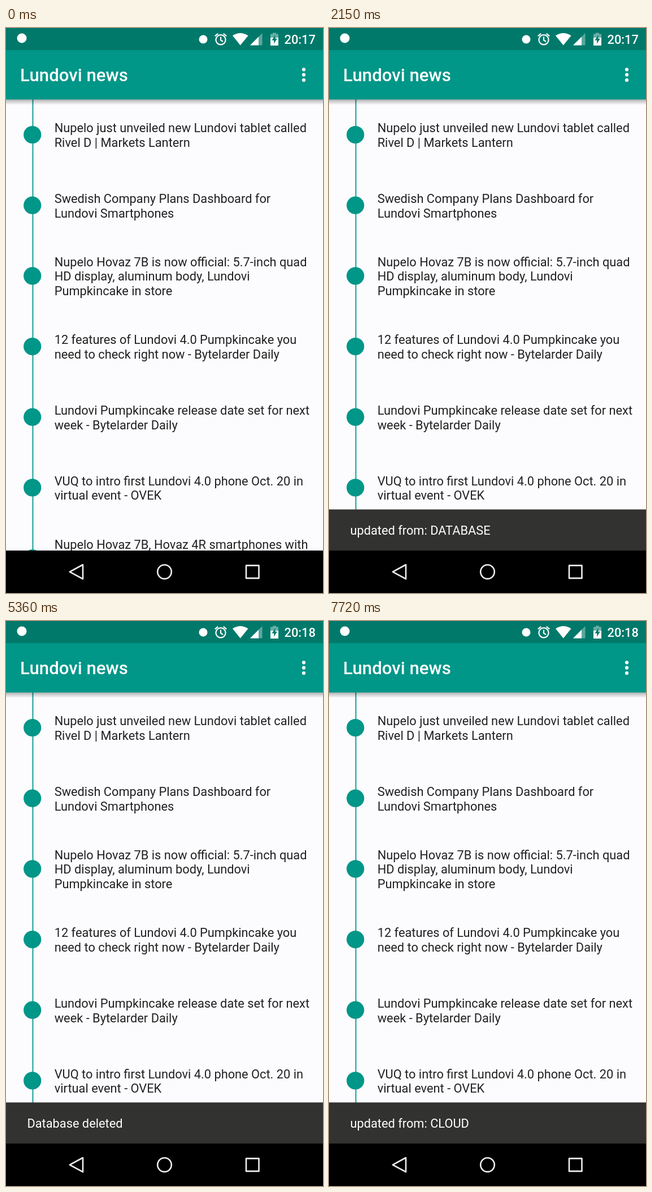
Recreate the animation shown at these times as an HTML page. Size 561x998 px, loop 8000 ms.

```html
<!DOCTYPE html>
<html lang="en">
<head>
<meta charset="utf-8">
<title>News timeline</title>
<style>
  html, body { margin: 0; width: 100%; height: 100%; overflow: hidden; background: #000; }
  svg { display: block; width: 100%; height: 100%; font: 21.8px Roboto, sans-serif; }
  #items text { fill: #212121; }
  #menu > .card { fill: #f7f5fb; filter: drop-shadow(0 1px 2px rgba(0, 0, 0, .22)) drop-shadow(0 6px 6px rgba(0, 0, 0, .3)); }
  #menu text { font-size: 24.93px; fill: #1e1e1e; }
  #menu .ripple, #touches g, #overflow { opacity: 0; }
  .medium { font-weight: 500; fill: #fff; }
</style>
</head>
<body>
<svg id="stage" viewBox="0 0 561 998">
  <defs>
    <linearGradient id="shade" x2="0" y2="1">
      <stop offset="0" stop-opacity=".3"/>
      <stop offset=".45" stop-opacity=".16"/>
      <stop offset="1" stop-opacity="0"/>
    </linearGradient>
    <clipPath id="bar"><rect y="39" width="561" height="87"/></clipPath>
  </defs>

  <rect width="561" height="998" fill="#fcfbfe"/>
  <g fill="#009688">
    <rect x="46.6" y="126" width="1.8" height="797"/>
    <g id="dots"></g>
  </g>
  <g id="items"></g>
  <g id="snacks"></g>

  <rect y="126" width="561" height="10" fill="url(#shade)"/>
  <rect y="39" width="561" height="87.3" fill="#009688"/>
  <rect width="561" height="39" fill="#00796b"/>
  <text class="medium" x="24.9" y="94" font-size="31.17">Lundovi news</text>
  <g fill="#fff">
    <circle id="overflow" cx="527" cy="82.6" r="37" clip-path="url(#bar)"/>
    <circle cx="527" cy="73.3" r="3.1"/>
    <circle cx="527" cy="82.6" r="3.1"/>
    <circle cx="527" cy="92" r="3.1"/>
  </g>

  <g id="status" fill="#fff">
    <circle cx="28" cy="18" r="8.5"/>
    <circle cx="349" cy="20" r="7.5"/>
    <g fill="none" stroke="#fff" stroke-width="2.2">
      <circle cx="380" cy="20.8" r="8.6"/>
      <path d="M380 15.5V21.3L384 24M369.8 14.4L375.2 9.9M390.2 14.4L384.8 9.9"/>
    </g>
    <path d="M401 13.5Q414.700 4.500 428.500 13.5L414.700 30.5Z"/>
    <path d="M432 30.500L453.500 9V30.500Z" opacity=".35"/>
    <path d="M432 30.500L447 15.500V30.500Z"/>
    <path d="M468 10.500H472V8.500H478V10.500H482V18H468Z" opacity=".4"/>
    <path d="M468 17H482V31H468Z"/>
    <path d="M476.500 12.500L470.500 21.800H474.200V27.800L479.800 18.700H476.500Z" fill="#00796b"/>
  </g>
  <text id="clockA" class="medium" x="492.500" y="28">20:17</text>
  <text id="clockB" class="medium" x="492.500" y="28">20:18</text>

  <rect y="923" width="561" height="75"/>
  <g fill="none" stroke="#eee" stroke-width="2.6" stroke-linejoin="round">
    <path d="M112.800 960.600L136 948V973.200Z"/>
    <circle cx="280.500" cy="960.600" r="12.300"/>
    <rect x="425" y="949.400" width="22.500" height="22.500"/>
  </g>

  <g id="menu"><rect class="card" x="249" y="45" width="305.500" height="224.500" rx="3"/></g>
  <g id="touches"></g>
</svg>
<script>
const LOOP = 8000;
const PITCH = 124.68, LINE = 25.55, ROW = 75;
const SLIDE = 'cubic-bezier(.4, 0, .2, 1)';

const headlines = [
  ['Nupelo just unveiled new Lundovi tablet called', 'Rivel D | Markets Lantern'],
  ['Swedish Company Plans Dashboard for', 'Lundovi Smartphones'],
  ['Nupelo Hovaz 7B is now official: 5.7-inch quad', 'HD display, aluminum body, Lundovi', 'Pumpkincake in store'],
  ['12 features of Lundovi 4.0 Pumpkincake you', 'need to check right now - Bytelarder Daily'],
  ['Lundovi Pumpkincake release date set for next', 'week - Bytelarder Daily'],
  ['VUQ to intro first Lundovi 4.0 phone Oct. 20 in', 'virtual event - OVEK'],
  ['Nupelo Hovaz 7B, Hovaz 4R smartphones with', '', '']
];

const byId = id => document.getElementById(id);

function add(parent, tag, attrs = {}, text = '') {
  const el = document.createElementNS('http://www.w3.org/2000/svg', tag);
  for (const key in attrs) el.setAttribute(key, attrs[key]);
  el.textContent = text;
  return parent.appendChild(el);
}

// Steps are [ms, value, easing towards the next step].
function track(el, prop, steps) {
  const all = [[0, steps[0][1]], ...steps, [LOOP, steps[steps.length - 1][1]]];
  el.animate(all.map(([ms, value, easing = 'linear']) =>
    ({ offset: ms / LOOP, [prop]: value, easing })),
    { duration: LOOP, iterations: Infinity });
}

headlines.forEach((lines, i) => {
  const middle = 188.5 + i * PITCH;
  add(byId('dots'), 'circle', { cx: 46.7, cy: middle, r: 15.6 });
  const first = middle - lines.length * LINE / 2 + 21.4;
  lines.forEach((line, n) =>
    add(byId('items'), 'text', { x: 85.7, y: first + n * LINE }, line));
});

function snack(message, start, length, leave) {
  const group = add(byId('snacks'), 'g');
  add(group, 'rect', { y: 850.4, width: 561, height: 74, fill: '#323230' });
  const label = add(group, 'text', { x: 37.4, y: 895.3, fill: '#fff' }, message);
  const down = 'translateY(74px)', up = 'translateY(0px)';
  const slide = [[start, down, SLIDE], [start + length, up]];
  const fade = [[start + 70, 0], [start + length, 1]];
  if (leave) {
    slide.push([leave, up, SLIDE], [leave + 250, down]);
    fade.push([leave, 1], [leave + 180, 0]);
  }
  track(group, 'transform', slide);
  track(label, 'opacity', fade);
}
snack('updated from: DATABASE', 1880, 255, 3635);
snack('Database deleted', 4450, 255, 6205);
snack('updated from: CLOUD', 7400, 290);

track(byId('clockA'), 'opacity', [[5360, 1], [5360, 0]]);
track(byId('clockB'), 'opacity', [[5360, 0], [5360, 1]]);

function touch(x, y, ms) {
  const dot = add(byId('touches'), 'g');
  add(dot, 'circle', { cx: x, cy: y, r: 17, fill: '#fff', 'fill-opacity': .8,
    stroke: '#cfcbe6', 'stroke-width': 2.2 });
  track(dot, 'opacity', [[ms, 0], [ms, 1], [ms + 100, 1], [ms + 100, 0]]);
}

['Force update', 'Delete database', 'Update cloud'].forEach((label, i) =>
  add(byId('menu'), 'text', { x: 274.3, y: 92 + i * ROW }, label));

// Each visit: press the overflow button, then pick a row.
const visits = [
  { press: 380, pick: 1560, x: 508.5, y: 71 },
  { press: 3330, pick: 4180, x: 505, y: 150 },
  { press: 5690, pick: 6650, x: 503, y: 226 }
];
const menuFade = [], glow = [];
visits.forEach(({ press, pick, x, y }, row) => {
  touch(520, 77, press);
  touch(x, y, pick);
  menuFade.push([press + 140, 0], [press + 300, 1], [pick + 150, 1], [pick + 300, 0]);
  glow.push([press, 0], [press + 130, .2], [press + 300, .2], [press + 600, 0]);

  const shade = add(byId('menu'), 'rect', { class: 'ripple', x: 249, y: 45 + row * ROW,
    width: 305.5, height: ROW, rx: 2 });
  track(shade, 'opacity', [[pick + 20, 0], [pick + 120, .1], [pick + 300, .1], [pick + 300, 0]]);
});
track(byId('menu'), 'opacity', menuFade);
track(byId('overflow'), 'opacity', glow);
</script>
</body>
</html>
```
